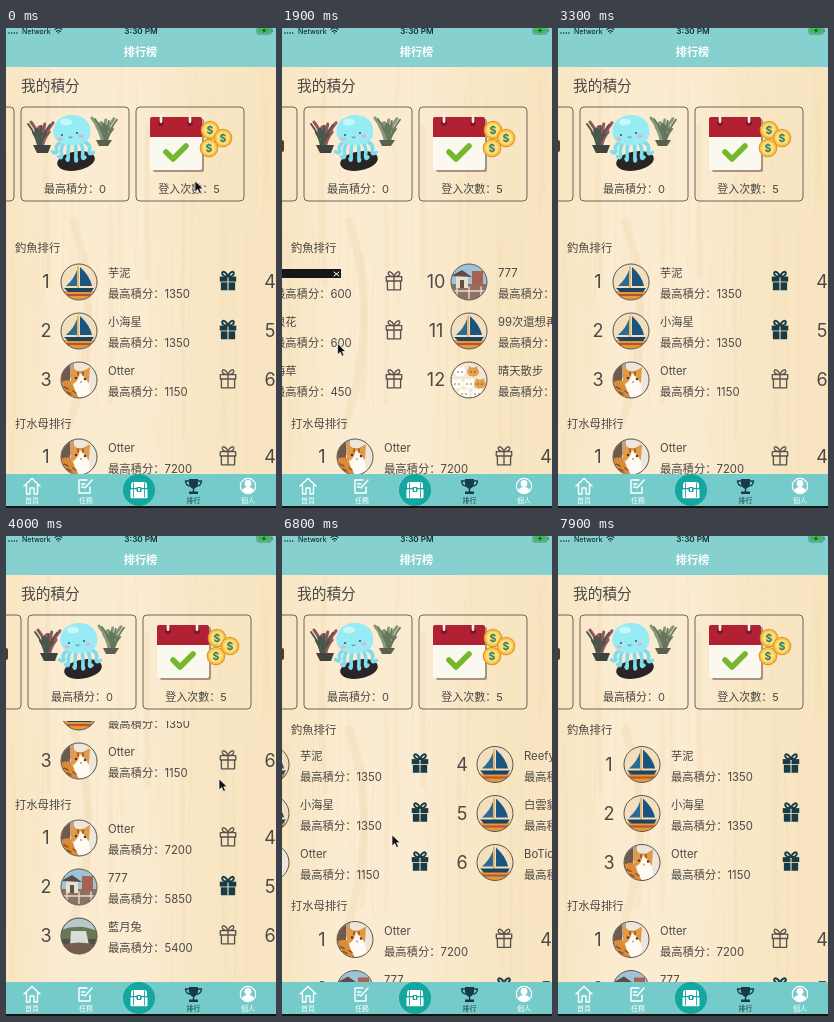
Animation of 270 by 480 pixels, one loop 8000 ms. Source, as an HTML page:

```html
<!DOCTYPE html>
<html lang="zh-CN">
<head>
<meta charset="utf-8">
<style>
html, body { margin: 0; width: 100%; height: 100%; overflow: hidden; background: #faebce; }
svg { display: block; width: 100vw; height: 100vh; }
text { font-family: Inter, "Noto Sans CJK SC", "Noto Sans CJK", sans-serif; fill: #4b4845; }
</style>
</head>
<body>
<svg id="stage" viewBox="0 0 270 480" xmlns="http://www.w3.org/2000/svg"></svg>
<script>
const stage = document.getElementById('stage');
const DARK = '#173c46', TEAL = '#75cbc9', HEADER = '#86d1cf', INK = '#142c2e';

const text = (x, y, size, str, attrs = '') =>
  `<text x="${x}" y="${y}" font-size="${size}" ${attrs}>${str}</text>`;
const path = (d, fill, stroke = 'none', width = 1) =>
  `<path d="${d}" fill="${fill}" stroke="${stroke}" stroke-width="${width}" stroke-linecap="round" stroke-linejoin="round"/>`;
const circle = (x, y, r, fill, attrs = '') => `<circle cx="${x}" cy="${y}" r="${r}" fill="${fill}" ${attrs}/>`;
const ellipse = (x, y, rx, ry, fill, attrs = '') =>
  `<ellipse cx="${x}" cy="${y}" rx="${rx}" ry="${ry}" fill="${fill}" ${attrs}/>`;
const rect = (x, y, w, h, fill, attrs = '') =>
  `<rect x="${x}" y="${y}" width="${w}" height="${h}" fill="${fill}" ${attrs}/>`;
const group = (x, y, body, attrs = '') => `<g transform="translate(${x} ${y})" ${attrs}>${body}</g>`;
const MIDDLE = 'text-anchor="middle"';

// Broad soft planks with finer grain on top
function wood() {
  let out = rect(0, 0, 270, 480, 'url(#plank)');
  for (let i = 0; i < 30; i++) {
    const x = i * 9.2 + 3 * Math.sin(i * 4.7);
    const bend = 6 * Math.sin(i * 2.3);
    const top = 20 + 110 * (1 + Math.sin(i * 7.1));
    out += `<path d="M${x} ${top}q${bend} 110 0 ${200 + 60 * Math.cos(i)}" fill="none" stroke="#f1dab3"
      stroke-width="${3 + Math.sin(i * 3) * 2}" opacity="${0.26 + 0.12 * Math.cos(i * 5)}"/>`;
  }
  return out + '<path d="M66 190Q100 290 62 400" fill="none" stroke="#f1dab3" stroke-width="8" opacity=".4"/>';
}

// Avatars, centred on 0,0
const avatars = {
  boat: rect(-18, -18, 36, 36, '#f3dfbd') +
    path('M-18 9H18V18H-18Z', '#e5973b') +
    path('M-18 13H18', 'none', '#b9542f', 2) +
    path('M-1 -15V7', 'none', '#d9a54b', 1.4) +
    path('M-2 -12Q-5 -3 -13 4H-2Z', '#2a6b93') +
    path('M1 -15Q11 -6 13 4H1Z', '#1c5480') +
    path('M-15 6H15L12 10H-11Z', '#1d4560'),
  cat: rect(-18, -18, 36, 36, '#eee6da') + rect(-18, -18, 9, 22, '#6f5b4b') +
    rect(-9, -18, 4, 16, '#b5a592') +
    path('M-18 2Q-10 -2 -3 3L4 18H-18Z', '#d98b3a') +
    path('M-8 4L-8 -14L-2 -9H4L11 -13L10 2Q5 9 0 8Q-6 8 -8 4Z', '#e39a48') +
    path('M1 -7Q8 -1 10 5L12 18H0Q-5 10 -6 4Q-1 2 1 -7Z', '#fffaf2') +
    circle(-3, -2, 1.2, '#4c3020') + circle(6, -1, 1.2, '#4c3020') + circle(2, 2, 1, '#d3918a') +
    path('M-15 7l4 2M-12 12l4 2M-6 11l3 2M-1 -8v3M4 -8v3', 'none', '#8f5320', 1.5),
  pier: rect(-18, -18, 36, 36, '#9cc3d6') + rect(-18, 2, 36, 16, '#8d7264') +
    rect(-13, -7, 12, 13, '#e6dfd4') + rect(3, -11, 11, 15, '#a9624f') +
    path('M-18 -6L-7 -12L3 -5Z', '#5e4b48') + rect(-9, -2, 4, 8, '#675043') +
    path('M-18 9H18M-12 5V17M0 5V17M12 5V17', 'none', '#ecd9c8', 1.4),
  falls: rect(-18, -18, 36, 36, '#4a5147') + rect(-18, -18, 36, 12, '#b9c8ca') +
    path('M-18 -6Q0 -13 18 -5V3H-18Z', '#6b7752') +
    path('M-8 -5H7L10 9H-9Z', '#d8dcda') + path('M-18 9Q0 4 18 9V18H-18Z', '#775c50'),
  cats: rect(-18, -18, 36, 36, '#f3e6d2') +
    [[-9, -8], [4, -8], [-12, 4], [0, 4], [11, 4], [-5, 14], [8, 14]].map(([x, y], i) => {
      const fur = i % 3 === 1 ? '#e0a050' : '#fffdf8';
      return path(`M${x - 5} ${y - 1}l1 -5l3 2h2l3 -2l1 5`, fur) + ellipse(x, y, 6, 4.6, fur) +
        circle(x - 2, y, .7, '#594032') + circle(x + 2, y, .7, '#594032');
    }).join('')
};
const avatar = (x, kind) => group(x, 0,
  `<g clip-path="url(#round)">${avatars[kind]}</g>` + circle(0, 0, 18, 'none', 'stroke="#59544f" stroke-width="1"'));

function gift(x, filled, id = '') {
  const bow = 'M0 -4C-7 -4 -6 -10 -3 -8Q-1 -7 0 -4C7 -4 6 -10 3 -8Q1 -7 0 -4';
  const body = filled
    ? rect(-7.5, -4, 15, 4.5, DARK) + rect(-6.5, 1.2, 13, 7.2, DARK) +
      path(bow, 'none', DARK, 1.8) + path('M0 -3V8', 'none', '#f2e5ce', 1)
    : path('M-7 -4H7V0H-7ZM-6 0V8H6V0M0 -4V8', 'none', '#56514d', 1.2) + path(bow, 'none', '#56514d', 1.2);
  return group(x, -1, `<g transform="scale(1.1)">${body}</g>`, id && `id="${id}"`);
}

const row = (x, y, rank, kind, name, score, filled, id) => group(x, y,
  text(40, 6, 18, rank, MIDDLE) + avatar(73, kind) +
  (name ? text(102, -5, 11.3, name)
        : rect(102, -13, 67, 9, '#171717') + path('M162 -10l5 4m0 -4l-5 4', 'none', '#fff')) +
  text(102, 16, 11.3, '最高積分：' + score) +
  (id ? gift(222, false, id + 'Off') + gift(222, true, id + 'On') : gift(222, filled)));

const fishing = [
  ['boat', '芋泥', 1350, true], ['boat', '小海星', 1350, true], ['cat', 'Otter', 1150, false, 'third'],
  ['boat', 'Reefy', 1050], ['boat', '白雲貓', 900], ['boat', 'BoTide', 750],
  ['boat', '', 600], ['cats', '浪花', 600], ['pier', '海草', 450],
  ['pier', '777', 0], ['boat', '99次還想再來呀', 0], ['cats', '晴天散步', 0]
];
const jelly = [
  ['cat', 'Otter', 7200], ['pier', '777', 5850, true], ['falls', '藍月兔', 5400],
  ['boat', '小海星', 4800], ['boat', '芋泥', 4200], ['cats', '浪花', 3600]
];
const board = (rows, top) => rows.map((r, i) =>
  row(Math.floor(i / 3) * 224, top + (i % 3) * 49, i + 1, ...r)).join('');

const cardFrame = x => rect(x, 79, 108, 94, 'none', 'rx="4" stroke="#6d655d" stroke-width="1"');

// A fan of branches growing from x,y
function plant(x, y, color, width) {
  return [-1, -.55, -.15, .25, .65, 1].map((lean, i) => {
    const height = 20 + 5 * Math.cos(i * 2.4);
    return path(`M${x} ${y}q${lean * 3} ${-height * .6} ${lean * 11} ${-height}
      M${x + lean * 4} ${y - height * .55}l${-lean * 3 - 2} -6`, 'none', color, width);
  }).join('');
}
function jellyCard() {
  const legs = [[-17, 12], [-12, 18], [-5, 21], [3, 22], [10, 19], [17, 13]].map(([dx, dy]) =>
    path(`M${74 + dx * .6} 113q${dx * .5} ${dy * .3} ${dx * .35} ${dy * .8}q0 4 ${dx * .25} 1`,
      'none', '#7fdcec', 3.6)).join('');
  return plant(43, 119, '#96545c', 3) + plant(40, 121, '#47584a', 2) +
    plant(104, 115, '#87997a', 3) + plant(107, 116, '#66765d', 1.8) +
    path('M34 117H52L49 125H38Z', '#3f4440') + path('M97 112H113L109 118H100Z', '#58604f') +
    ellipse(77, 133, 19, 9.5, '#292425', 'transform="rotate(-10 77 133)"') + legs +
    path('M55 108C52 95 62 87 73 87C86 87 93 96 91 107C89 120 59 121 55 108Z', '#96ebf5') +
    ellipse(67, 94, 6, 3.4, '#c8f7fb') + circle(63, 107, 1.1, '#315c6c') + circle(78, 105, 1.1, '#315c6c') +
    ellipse(61, 111, 2.6, 1.6, '#f3a9bd') + ellipse(82, 108, 2.6, 1.6, '#f3a9bd') +
    path('M70 109q1.5 1.5 3 0', 'none', '#315c6c', .8) +
    text(76, 164.5, 11, '最高積分：0', MIDDLE);
}
function coin(x, y) {
  return circle(x, y, 9.3, '#dc9a2c') + circle(x, y, 8, '#fbc94f') + circle(x, y, 6.2, '#ffdf7d') +
    text(x, y + 3.8, 10.5, '$', `${MIDDLE} font-weight="700" style="fill:#2f8062"`);
}
function calendarCard() {
  return rect(154, 91, 51, 53, '#a8947e', 'rx="2"') + rect(151, 89, 52, 53, '#fbf8f0', 'rx="2"') +
    path('M151 109V91Q151 89 153 89H201Q203 89 203 91V109Z', '#b22034') +
    [162, 191].map(x => circle(x, 95, 3, '#771a26') + rect(x - 1.3, 86, 2.6, 9, '#f4eee5', 'rx="1.3"')).join('') +
    path('M167 124L174 131L187 118', 'none', '#75b82e', 5.6) +
    coin(211, 102) + coin(224, 110) + coin(210, 120) +
    text(190, 164.5, 11, '登入次數：5', MIDDLE);
}

function statusBar() {
  const ink = `style="fill:${INK}"`;
  return rect(0, 0, 270, 39, HEADER) +
    [3, 5.6, 8.2, 10.8].map(x => circle(x, 5, .8, INK)).join('') +
    text(16, 5.7, 7, 'Network', `${ink} font-weight="500"`) +
    path('M49 1.5q3.5 -3 7 0M50.5 3.5q2 -2 4 0', 'none', INK, 1.1) + circle(52.5, 5, .8, INK) +
    text(135, 5.7, 8.2, '3:30 PM', `${MIDDLE} ${ink} font-weight="600"`) +
    rect(251, -1, 14, 7, 'none', 'rx="1.5" stroke="#315f50" stroke-width=".7"') +
    rect(252, 0, 12, 5, '#36bd54', 'rx="1"') + rect(265.6, 1.3, 1, 2.5, '#315f50') +
    path('M259 0L256 3H258L257 5L260 2.3H258Z', INK) +
    text(134.5, 28, 11.2, '排行榜', `${MIDDLE} style="fill:#fff" font-weight="600"`);
}
function navBar() {
  const label = (x, str, color = '#fff') =>
    text(x, 475, 7, str, `${MIDDLE} font-weight="500" style="fill:${color}"`);
  return rect(0, 446, 270, 32, TEAL) +
    path('M18 458L26 450.5L34 458M20.5 457V466H24V460H28V466H31.5V457', 'none', '#fff', 1.4) +
    path('M84 459V465H73V452H81M75.5 456H79M75.5 459H78M79 460L86 452', 'none', '#fff', 1.4) +
    circle(133, 462, 16, '#14a69f') +
    path('M125 460V457Q125 454 128 454H138Q141 454 141 457V460Z', '#fff') +
    rect(124.5, 461.3, 17, 9, '#fff', 'rx="1"') + rect(130.5, 459, 5, 5, '#14a69f', 'rx="1"') +
    rect(132, 460, 2, 3, '#fff') + path('M127.5 455V469M138.5 455V469', 'none', '#14a69f', .9) +
    path('M183 451H192V456Q191 460 187.5 461Q184 460 183 456Z', DARK) +
    path('M183 453H179.5Q180 458 184 458M192 453H195.5Q195 458 191 458M187.5 460V464', 'none', DARK, 1.4) +
    rect(183, 463.5, 9, 2.5, DARK) +
    circle(242, 458, 7.7, 'none', 'stroke="#fff" stroke-width="1.2"') + circle(242, 455.5, 3.4, '#fff') +
    path('M236 463Q237 459 242 459Q247 459 248 463Q242 468 236 463Z', '#fff') +
    label(26, '首頁') + label(80, '任務') + label(187.5, '排行', DARK) + label(242, '個人') +
    rect(0, 478, 270, 2, '#101414');
}

stage.innerHTML = `<defs>
  <linearGradient id="plank">
    <stop offset="0" stop-color="#f8e5c1"/><stop offset=".2" stop-color="#fbebd0"/>
    <stop offset=".5" stop-color="#fbebd0"/><stop offset=".75" stop-color="#f8e6c4"/>
    <stop offset="1" stop-color="#f8e4c0"/>
  </linearGradient>
  <clipPath id="round"><circle r="17.7"/></clipPath>
  <clipPath id="listArea"><rect y="185" width="270" height="261"/></clipPath></defs>` +
  wood() + text(15, 62.5, 14.7, '我的積分') +
  `<g id="cards">${rect(-10, 112, 12, 12, '#5c3733', 'rx="2"') + cardFrame(-93) + cardFrame(22) + cardFrame(137) +
    jellyCard() + calendarCard()}</g>
  <g clip-path="url(#listArea)"><g id="list">` +
  text(9, 223.5, 11.3, '釣魚排行') + `<g id="fishing">${board(fishing, 254)}</g>` +
  text(9, 399.5, 11.3, '打水母排行') + board(jelly, 429) + '</g></g>' +
  statusBar() + navBar() +
  `<g id="cursor">${path('M0 0V11L2.7 8.5L4.6 12.5L6.5 11.6L4.7 7.8H8Z', '#111', '#fff', .7)}</g>`;

// Each track is a list of [time, value...]
const tracks = {
  cards: [[0, -7], [300, -1], [500, 0]],
  fishing: [[0, 0], [400, 0], [700, -240], [1000, -540], [1200, -608], [1800, -616], [2000, -500],
    [2400, -40], [2600, 36], [2900, 0], [6400, 0], [6800, -84], [7000, -60], [7250, 36], [7600, 36], [7900, 11], [8000, 4]],
  list: [[0, 0], [3650, 0], [4000, -127], [4400, -127], [4900, -25.5], [8000, -25.5]],
  cursor: [[0, 189, 153], [300, 230, 290], [600, 70, 305], [800, 210, 310], [1200, 19, 316], [1800, 40, 316],
    [2400, 250, 312], [2600, 285, 310], [3300, 285, 320], [3700, 222, 370], [4000, 213, 243], [4400, 200, 250],
    [4900, 192, 414], [5500, 210, 350], [5900, 222, 323], [6400, 200, 304], [6800, 110, 299],
    [7300, 245, 300], [7600, 280, 300], [8000, 285, 300]]
};
function sample(track, t) {
  const next = track.findIndex(k => k[0] > t);
  if (next < 0) return track[track.length - 1].slice(1);
  const a = track[next - 1], b = track[next];
  const p = (t - a[0]) / (b[0] - a[0]), e = p * p * (3 - 2 * p);
  return a.slice(1).map((v, i) => v + (b[i + 1] - v) * e);
}
const $ = id => document.getElementById(id);
const move = (id, x, y) => $(id).setAttribute('transform', `translate(${x} ${y})`);

function draw(now) {
  const t = Math.floor(now % 8000 / 100) * 100;
  move('cards', sample(tracks.cards, t)[0], 0);
  move('fishing', sample(tracks.fishing, t)[0], 0);
  move('list', 0, sample(tracks.list, t)[0]);
  move('cursor', ...sample(tracks.cursor, t));
  const sent = t >= 6000;
  $('thirdOn').style.display = sent ? '' : 'none';
  $('thirdOff').style.display = sent ? 'none' : '';
}
const start = performance.now();
function frame() {
  draw(performance.now() - start);
  requestAnimationFrame(frame);
}
frame();
</script>
</body>
</html>
```
